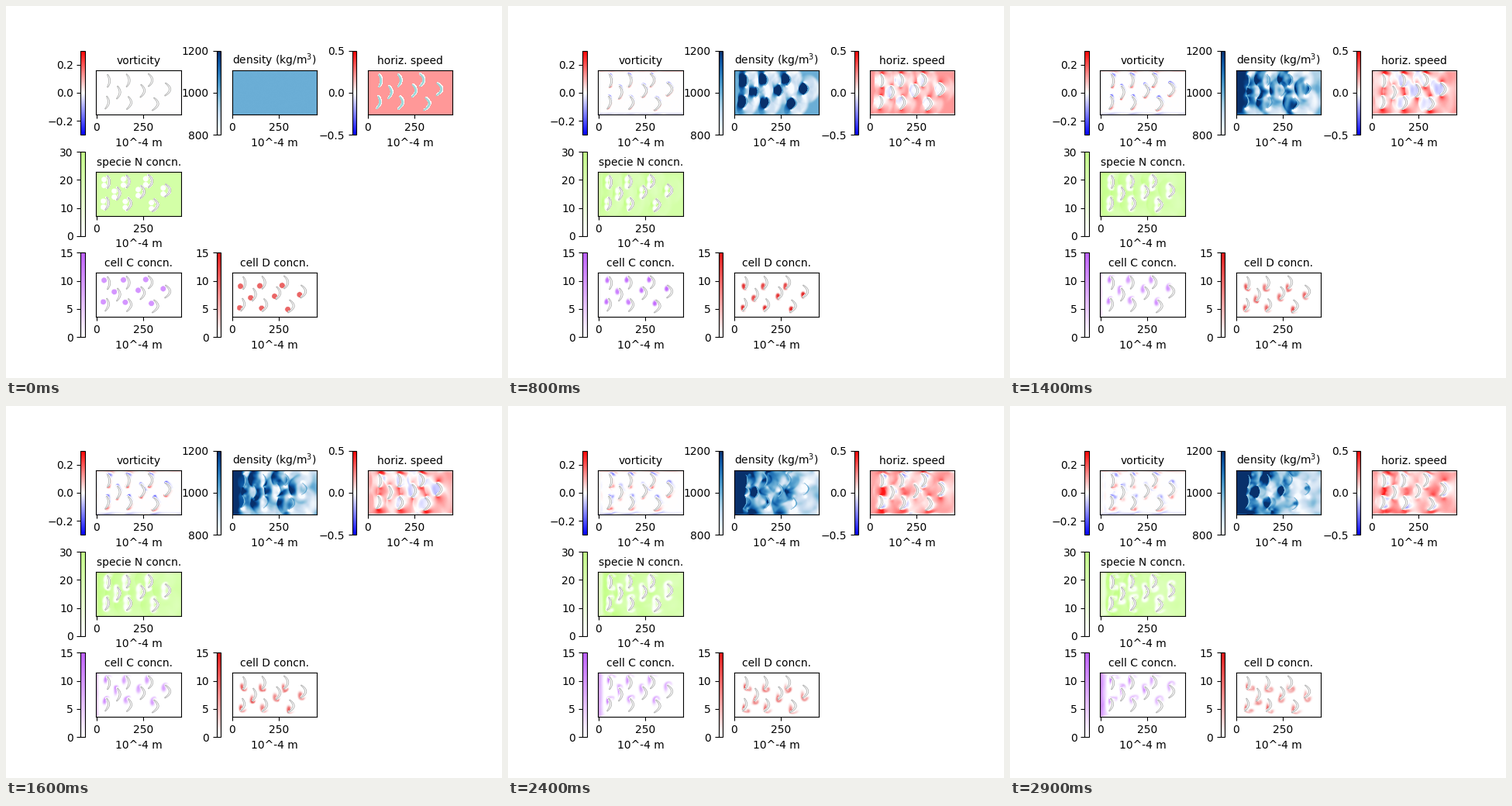
Write a matplotlib script that moves like this. It is 640x480 px and loops after 3000 ms.

```python
import numpy as np
import matplotlib.pyplot as plt
from matplotlib.animation import FuncAnimation
from matplotlib.colors import LinearSegmentedColormap
from matplotlib.patches import Polygon
from matplotlib.path import Path

FRAMES, STEPS = 30, 5
WIDTH, HEIGHT = 455, 237
NX, NY = 228, 119            # each cell covers 2 x 2 length units
UNIT = 4.16                  # length units per screen pixel
U0, U_MAX = 0.2, 0.45
TAU, TAU_S = 0.61, 0.6
N0, CELL0 = 22, 10

# foremost point of each curved obstacle, in panel pixels
APEXES = [(17, 13), (42.5, 12.5), (72, 12), (30.5, 28), (62, 26), (95, 24),
          (16, 41), (45, 41.5), (79.5, 43)]

# D2Q9 lattice
EX = np.array([0, 1, 0, -1, 0, 1, -1, -1, 1])
EY = np.array([0, 0, 1, 0, -1, 1, 1, -1, -1])
WT = [4 / 9] + 4 * [1 / 9] + 4 * [1 / 36]
OPP = [0, 3, 4, 1, 2, 7, 8, 5, 6]

X, Y = np.meshgrid(2 * np.arange(NX) + 0.5, 2 * np.arange(NY) + 0.5)


def bulge(x):
    """Obstacles further downstream are more strongly curved."""
    return 2 + x / 24


def crescent(x, y):
    s = np.linspace(-1, 1, 25)
    lean = np.maximum(s, 0) * (y - 13) / 14
    mid = np.stack([x - bulge(x) * s ** 2 - lean, y + 8.2 * s], 1)
    tangent = np.gradient(mid, axis=0)
    normal = np.stack([-tangent[:, 1], tangent[:, 0]], 1)
    normal /= np.hypot(*normal.T)[:, None]
    side = (0.5 + 0.6 * np.cos(np.pi * s / 2))[:, None] * normal
    return UNIT * np.concatenate([mid + side, (mid - side)[::-1]])


def dots(dy):
    hit = [np.hypot(X / UNIT - (x - 5 - 0.6 * bulge(x)), Y / UNIT - y - dy) < 3.5
           for x, y in APEXES]
    return np.any(hit, axis=0)


def equilibrium(rho, u, v):
    base = 1 - 1.5 * (u * u + v * v)
    out = np.empty((9,) + np.shape(rho), np.float32)
    for i in range(9):
        eu = 3 * (EX[i] * u + EY[i] * v)
        out[i] = WT[i] * rho * (base + eu + 0.5 * eu * eu)
    return out


def stream(f, rho_in):
    """Move populations one cell; steady inflow left, open edge right."""
    for i in range(1, 9):
        f[i] = np.roll(f[i], (EY[i], EX[i]), (0, 1))
    rho = rho_in + np.zeros(NY)
    f[:, :, 0] = equilibrium(rho, U0, 0)
    f[:, :, -1] = f[:, :, -2]


def relax(f, feq, tau, walls):
    bounced = f[:, walls][OPP]
    f += (feq - f) / tau
    f[:, walls] = bounced


def vorticity(u, v):
    curl = 0.5 * (np.roll(u, -1, 0) - np.roll(u, 1, 0)
                  - np.roll(v, -1, 1) + np.roll(v, 1, 1))
    curl[:, [0, -1]] = 0
    curl[[0, -1]] = 0
    return curl


def simulate(solid, c, d):
    rng = np.random.default_rng(3)
    walls = solid.copy()
    walls[[0, -1]] = True
    one = np.ones((NY, NX))
    f = equilibrium(one, U0, 0)
    f *= 1 + 0.004 * rng.standard_normal(f.shape).astype(np.float32)
    n = np.where((c > 0) | (d > 0), 0, N0)
    scalars = [equilibrium(s * one, U0, 0) for s in (n, c, d)]
    shots = []
    for step in range(FRAMES * STEPS):
        if step:
            # part of the pressure wave passes out through the inlet
            stream(f, 0.4 + 0.6 * f[:, :, 1].sum(0))
            c_in = 10 * np.clip((step / STEPS - 7) / 20, 0, 1) ** 0.7
            for s, rho_in in zip(scalars, (N0, c_in, 0)):
                stream(s, rho_in)
        rho = f.sum(0)
        u = np.clip(np.tensordot(EX, f, 1) / rho, -U_MAX, U_MAX)
        v = np.clip(np.tensordot(EY, f, 1) / rho, -U_MAX, U_MAX)
        if step:
            u[walls] = v[walls] = 0
        amounts = [s.sum(0) for s in scalars]
        if step % STEPS == 0:
            curl, speed, *conc = [np.ma.array(a.copy(), mask=solid)
                                  for a in (vorticity(u, v), u, *amounts)]
            shots.append([curl, 1000 * rho, speed, *conc])
        relax(f, equilibrium(rho, u, v), TAU, walls)
        for s, amount in zip(scalars, amounts):
            relax(s, equilibrium(amount, u, v), TAU_S, walls)
        scalars[0] *= 1 - 0.0025 * np.clip(amounts[1] + amounts[2], 0, 20)
    return shots


shapes = [crescent(x, y) for x, y in APEXES]
cells = np.column_stack([X.ravel(), Y.ravel()])
solid = np.any([Path(s).contains_points(cells) for s in shapes], axis=0)
solid = solid.reshape(NY, NX)
d_hit = dots(4.5)
c_hit = dots(-3.2) & ~d_hit
shots = simulate(solid, CELL0 * c_hit, CELL0 * d_hit)


def fade(color):
    return LinearSegmentedColormap.from_list(color, ["white", color])


PANELS = [
    (1, "vorticity", "bwr", -0.3, 0.3),
    (2, "density (kg/m$^3$)", "Blues", 800, 1200),
    (3, "horiz. speed", "bwr", -0.5, 0.5),
    (4, "specie N concn.", fade("#c4ff88"), 0, 30),
    (7, "cell C concn.", fade("#bf60ff"), 0, 15),
    (8, "cell D concn.", fade("#e01818"), 0, 15),
]

fig = plt.figure(figsize=(6.4, 4.8), dpi=100)
images, speed_outlines = [], []
for place, title, cmap, low, high in PANELS:
    ax = fig.add_subplot(3, 3, place)
    im = ax.imshow(shots[0][len(images)], cmap=cmap, vmin=low, vmax=high,
                   extent=(-0.5, WIDTH - 0.5, HEIGHT - 0.5, -0.5))
    fig.colorbar(im, ax=ax, location="left")
    ax.set_title(title, fontsize=10)
    ax.set_xlabel("10^-4 m")
    ax.set_yticks([])
    if place != 2:
        for s in shapes:
            patch = ax.add_patch(Polygon(s, fc="white", ec="#a0a0a0", lw=0.5))
            if place == 3:
                speed_outlines.append(patch)
    images.append(im)


def update(k):
    for im, data in zip(images, shots[k]):
        im.set_data(data)
    for patch in speed_outlines:
        patch.set_edgecolor("#a0a0a0" if k else "#a8c8c8")
        patch.set_facecolor("white" if k else "#90e0e0")
    return images + speed_outlines


anim = FuncAnimation(fig, update, frames=FRAMES, interval=100, repeat=True,
                     repeat_delay=0, blit=False)
plt.show()
```
